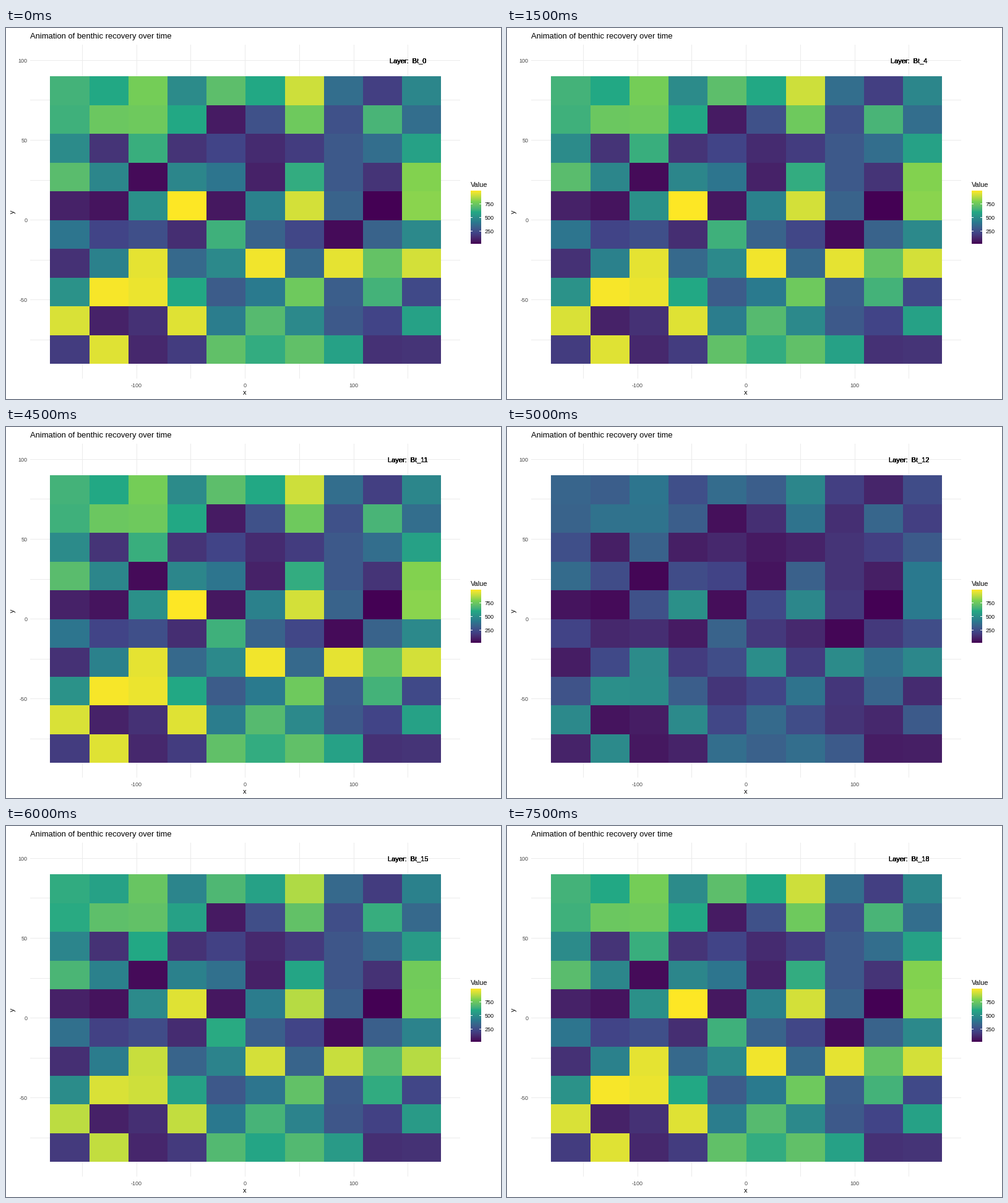
A matplotlib script that plays this animation: 800 px wide and 600 px high, repeating every 8000 ms.

```python
import numpy as np
import matplotlib.pyplot as plt
from matplotlib.animation import FuncAnimation
from matplotlib.patches import Rectangle

W, H, DPI = 800, 600, 100
FRAMES, INTERVAL = 16, 500
GRID = "#EBEBEB"

plt.rcParams["font.family"] = "Liberation Sans"

# Cell values in percent of the colour scale, top row first
VALUES = np.array([
    [65, 60, 78, 48, 71, 60, 92, 36, 18, 46],
    [64, 75, 76, 60, 6, 25, 76, 25, 66, 36],
    [48, 14, 63, 14, 20, 11, 17, 28, 36, 57],
    [70, 46, 2, 46, 39, 8, 62, 28, 14, 81],
    [8, 4, 50, 100, 5, 44, 93, 32, 0, 82],
    [39, 20, 24, 12, 64, 32, 21, 2, 32, 47],
    [13, 44, 96, 34, 47, 98, 34, 96, 73, 93],
    [51, 99, 97, 60, 29, 41, 76, 30, 65, 22],
    [94, 8, 13, 95, 42, 69, 47, 28, 20, 57],
    [17, 95, 10, 17, 72, 62, 72, 57, 13, 14],
]) / 100

# Share of the full value left in the layers around the disturbance
RECOVERY = {12: 0.5, 13: 0.65, 14: 0.8, 15: 0.95}

STOPS = np.array([[68, 1, 84], [65, 68, 135], [42, 120, 142],
                  [34, 168, 132], [122, 209, 81], [253, 231, 37]]) / 255
TO_XYZ = np.array([[0.4124, 0.3576, 0.1805],
                   [0.2126, 0.7152, 0.0722],
                   [0.0193, 0.1192, 0.9505]])
WHITE = TO_XYZ.sum(axis=1)
TO_LAB = np.array([[0, 116, 0], [500, -500, 0], [0, 200, -200]])


def rgb_to_lab(rgb):
    lin = np.where(rgb > 0.04045, ((rgb + 0.055) / 1.055) ** 2.4, rgb / 12.92)
    xyz = lin @ TO_XYZ.T / WHITE
    f = np.where(xyz > 0.008856, np.cbrt(xyz), 7.787 * xyz + 16 / 116)
    return f @ TO_LAB.T - [16, 0, 0]


def lab_to_rgb(lab):
    fy = (lab[..., 0] + 16) / 116
    f = np.stack([fy + lab[..., 1] / 500, fy, fy - lab[..., 2] / 200], axis=-1)
    xyz = np.where(f > 0.2069, f ** 3, (f - 16 / 116) / 7.787) * WHITE
    lin = np.clip(xyz @ np.linalg.inv(TO_XYZ).T, 0, 1)
    rgb = np.where(lin > 0.0031308, 1.055 * lin ** (1 / 2.4) - 0.055, 12.92 * lin)
    return np.clip(rgb, 0, 1)


LAB_STOPS = rgb_to_lab(STOPS)


def colour(t):
    """Map 0..1 to RGB, blending the stops in Lab space."""
    pos = np.linspace(0, 1, len(STOPS))
    lab = np.stack([np.interp(t, pos, LAB_STOPS[:, k]) for k in range(3)], axis=-1)
    return lab_to_rgb(lab)


fig = plt.figure(figsize=(W / DPI, H / DPI), dpi=DPI, facecolor="white")
ax = fig.add_axes([0, 0, 1, 1])
ax.set_xlim(0, W)
ax.set_ylim(H, 0)
ax.axis("off")


def box(x, y, w, h, fill, z=1):
    ax.add_patch(Rectangle((x, y), w, h, fc=fill, lw=0, antialiased=False, zorder=z))


def text(x, y, s, px, fill="black", ha="left", **kw):
    return ax.text(x, y, s, fontsize=px * 72 / DPI, color=fill, ha=ha,
                   va=kw.pop("va", "baseline"), zorder=5, **kw)


def px_x(v):
    return 386.6 + 1.7556 * v


def px_y(v):
    return 310.6 - 2.5833 * v


# Grid and axis labels
for v in range(-150, 151, 50):
    box(int(px_x(v)), 27, 1, 540, GRID)
    if v % 100 == 0:
        text(px_x(v), 581, str(v), 9, "#4D4D4D", "center")
for v in range(-75, 101, 25):
    box(39, int(px_y(v)), 695, 1, GRID)
    if v % 50 == 0:
        text(34.3, int(px_y(v)) + 4, str(v), 9, "#4D4D4D", "right")

text(39, 17, "Animation of benthic recovery over time", 13)
text(386, 593, "x", 11, ha="center")
text(11, 297, "y", 11, ha="center", va="center", rotation=90)

# Colour legend
text(751, 257, "Value", 11)
bar = colour(np.linspace(1, 0, 86))[:, None, :]
ax.imshow(bar, extent=(751, 768, 349, 263), aspect="auto",
          interpolation="nearest", zorder=2)
for v, y in ((750, 284), (500, 306), (250, 328)):
    box(751, y, 3, 1, "white", 3)
    box(765, y, 3, 1, "white", 3)
    text(774, y + 4, str(v), 9)
ax.set_xlim(0, W)
ax.set_ylim(H, 0)

# Raster cells
cols = np.ceil(71 + 63.2 * np.arange(11) - 1e-6)
rows = np.ceil(78 + 46.5 * np.arange(11) - 1e-6)
cells = ax.pcolormesh(cols, rows, colour(VALUES), antialiased=False,
                      edgecolors="none", zorder=2)

# Stacked copies give the heavy overprinted look
labels = [text(649.4, 57, "", 11, ha="center") for _ in range(5)]


def update(i):
    layer = round(i * 11 / 9)
    cells.set_array(colour(VALUES * RECOVERY.get(layer, 1)))
    for label in labels:
        label.set_text(f"Layer:  Bt_{layer}")
    return [cells, *labels]


anim = FuncAnimation(fig, update, frames=FRAMES, interval=INTERVAL,
                     repeat=True, repeat_delay=0, blit=False)
plt.show()
```
